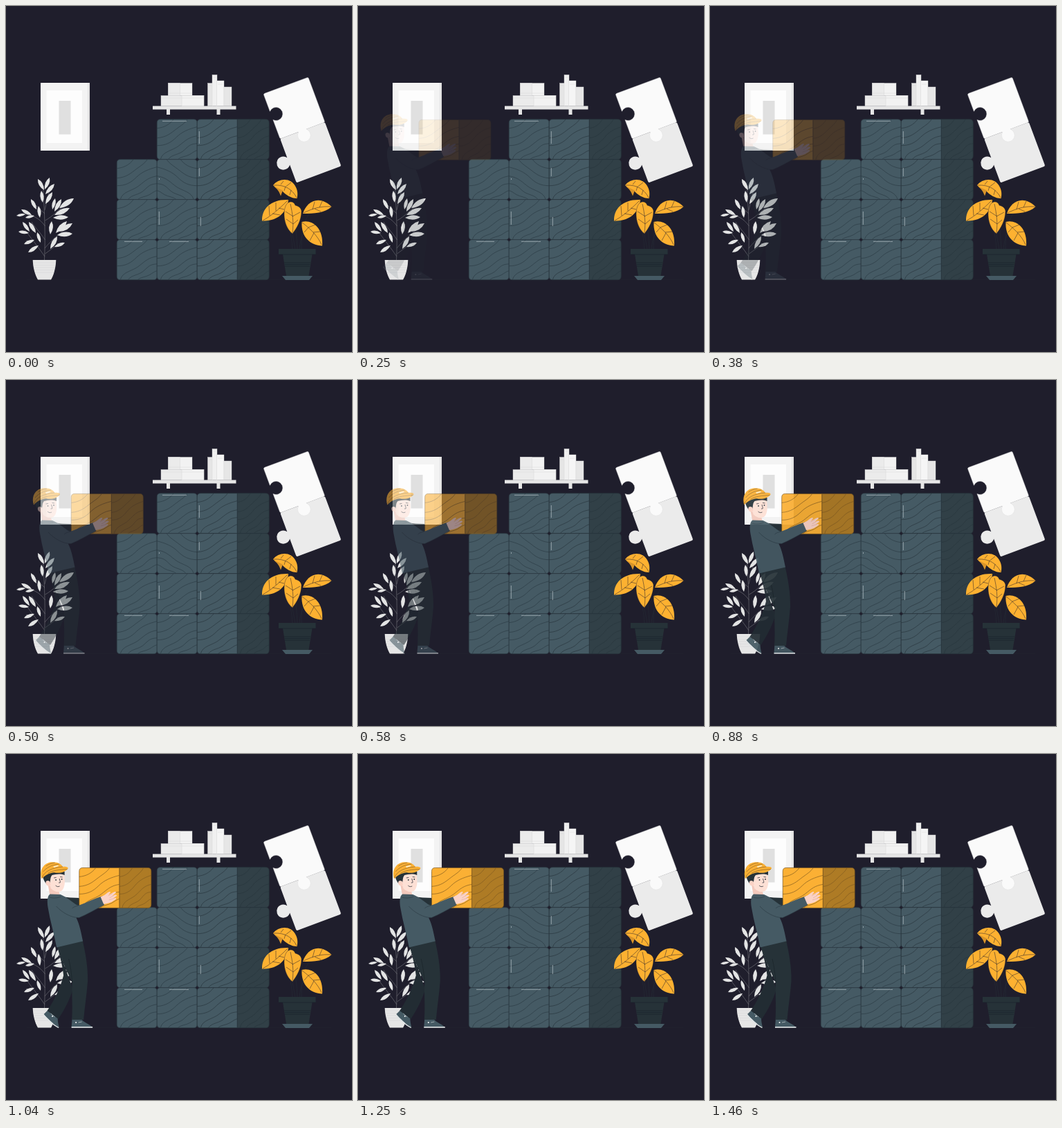
An HTML page that plays this animation: 500x500 px, repeating every 1.5 s.

```html
<!DOCTYPE html>
<html lang="en">
<head>
<meta charset="utf-8">
<title>Stacking crates</title>
<style>
  html, body { margin: 0; width: 100%; height: 100%; overflow: hidden; background: #1f1e2c; }
  svg { display: block; width: 100%; height: 100%; }
</style>
</head>
<body>
<svg viewBox="0 0 500 500" xmlns="http://www.w3.org/2000/svg">
  <defs>
    <path id="grain" fill="none" d="M0 13C10 12 18 8 24 0M0 27C14 26 20 20 28 14S40 6 44 0M0 38C12 38 20 34 28 26S46 14 58 11M5 58C8 46 22 46 32 38S46 26 58 24M16 58C22 50 32 52 40 44S50 36 58 35M30 58C34 54 42 54 47 51S54 46 58 45"/>
  </defs>
  <rect width="500" height="500" fill="#1f1e2c"/>
  <path d="M30 395.7H470" stroke="#222631" stroke-width=".5"/>

  <!-- picture -->
  <rect x="50" y="111" width="71" height="98" fill="#f3f3f3"/>
  <path d="M118 111H121V209H118Z" fill="#e4e4e4"/>
  <rect x="58.5" y="122" width="51.5" height="76" fill="#fdfdfd"/>
  <rect x="76.5" y="137" width="17" height="48.5" fill="#e0e0e0"/>

  <!-- shelf -->
  <g stroke="#d2d2d2" stroke-width=".4">
    <rect x="224" y="129.5" width="62" height="15" fill="#ebebeb"/>
    <rect x="254" y="129.5" width="32" height="15" fill="#f2f2f2"/>
    <rect x="234.5" y="111.5" width="34.5" height="18" fill="#f2f2f2"/>
    <rect x="234.5" y="111.5" width="17" height="18" fill="#ebebeb"/>
    <rect x="291.5" y="111.5" width="7" height="33" fill="#e6e6e6"/>
    <rect x="298" y="99.5" width="7" height="45" fill="#f0f0f0"/>
    <rect x="304.5" y="108" width="10.5" height="36.5" fill="#f5f5f5"/>
    <rect x="315" y="117" width="11" height="27.5" fill="#e6e6e6"/>
    <path d="M224 133H286M234.5 126H269M293 115H297M299.500 103H303.500M306 113H313" fill="none"/>
  </g>
  <path d="M212 144.500H332.500V149.500H309.500V157H304.500V149.500H237V157H232V149.500H212Z" fill="#e6e6e6"/>

  <!-- puzzle -->
  <g transform="translate(372 127) rotate(-20.400)">
    <path d="M2 69.300H67Q69 69.300 69 71.300V135Q69 137 67 137H2Q0 137 0 135V109.300A9.600 9.600 0 1 1 0 98.300V71.300Q0 69.300 2 69.300Z" fill="#ebebeb"/>
    <path d="M2 0H67Q69 0 69 2V67.500Q69 69.300 67 69.300H40.300A9.400 9.400 0 1 1 28.300 69.300H2Q0 69.300 0 67.500V40A9.600 9.600 0 1 0 0 27V2Q0 0 2 0Z" fill="#fafafa" stroke="#dcdcdc" stroke-width=".4"/>
  </g>

  <g id="stack" stroke-width=".7"></g>
  <path d="M226 166.300H261M279.300 181V199M279.300 234V246M221.300 297V316M281.300 305V318M171 340.300H197M236 340.300H264M221.500 249V251" stroke="#b9c5ca" stroke-width=".7" fill="none"/>

  <!-- plant on the right -->
  <path d="M418 352C414 330 412 320 411 300M421 352C420 315 412 290 408 272M424 352C426 330 432 322 438 322M427 352C427 320 432 305 445 292M414 352C412 320 404 300 396 292" stroke="#262c37" stroke-width=".6" fill="none"/>
  <g fill="#fdb131">
    <path d="M386 259C394 249 412 247 419 262C422 268 421.500 274 420.500 278C412 278 404 273 399 267C394 266.500 390 263 386 259Z"/>
    <path d="M387 260.500C393 265 395 269 397 274.500L400 266.500Z" fill="#d9942a"/>
    <path d="M370 310.500C369 293 383 279 408 280C407 296 394 311.500 370 310.500Z"/>
    <path d="M429 300C434 283 452 272 470.500 290C460 299.500 446 300 429 300Z"/>
    <path d="M427.500 312C440 308 459 318 457 346.500C440 346 426 334 427.500 312Z"/>
    <path d="M414 329C402 320 399 298 405 287C409 281 416 282 418 288C422 289 426 291 427 296C427 310 420 321 414 329Z" stroke="#1f1e2c" stroke-width=".4"/>
  </g>
  <path d="M387 259C403 258 414 265 420 277M397 258L401 253M405 260.500L412 255M404 260.500L402 267M412 266L410 273M371 310C384 303 396 292 407 281M381 303L380 289M390 296L390 284M385 300L396 302M394 292L402 294M414 328C416 312 414 300 411 286M415 315L405 308M415 304L404 297M415 315L422 309M414 304L425 298M430 299C444 292 456 289 470 290M443 294L446 283M453 291L457 282M446 293L455 297M428 313C440 322 451 333 456 345M437 320L447 316M444 327L455 326M437 320L431 327M445 328L439 339" fill="none" stroke="#312a2b" stroke-width=".55"/>
  <path d="M394 351H447.500V359H442.500L437.500 390H405L400 359H394Z" fill="#263238"/>
  <path d="M394 359H447.500M402 371H440M402.500 373.500H439.500M403 376H439" stroke="#17212a" stroke-width=".6"/>
  <path d="M399 390H443L438 396H404Z" fill="#455a64"/>

  <!-- plant on the left -->
  <path d="M55.500 367C57 335 56 300 53.500 262M56 362C48 350 38 338 30 327M56 350C66 338 76 330 84 324M56.500 338C48 325 40 318 37 312M56.500 318C48 306 38 302 24 300M56.500 310C68 304 78 292 88 286M56 295C58 286 60 278 62 270M56.500 358C64 353 70 347 78 343M56 300C52 296 47 292 43 288" fill="none" stroke="#77777f" stroke-width=".6"/>
  <g id="leaves" fill="#e3e4e4"></g>
  <path d="M38.700 367H72.300C72 380 68 391 65 395.500H46C42 389 39 378 38.700 367Z" fill="#e6e6e6"/>
  <path d="M39 371H72M39.500 374.500H71.500M40 378H71M41 381.500H70M42 385H69" stroke="#d3d3d5" stroke-width=".5"/>

  <!-- worker with crate -->
  <g id="worker">
    <path d="M78 206C88 207 96 208 105 208V221H90Z" fill="#263238"/>
    <g id="crate" stroke-width=".7"></g>

    <!-- legs and shoes -->
    <path d="M60 370L74 381C74 386 75 391 76 395C68 391 59 382 54 376Z" fill="#455a64"/>
    <path d="M54 376C59 382 68 391 76 395L75 396C67 392 57 383 53.500 377.500Z" fill="#dfe4e6"/>
    <path d="M95 382H107C113 389 121 391 124 394.500H94Z" fill="#455a64"/>
    <path d="M94 394H124.500V395.700H94Z" fill="#dfe4e6"/>
    <path d="M73 276C77 292 81 304 82.500 320C78 338 69 356 59 371L75 383C84 369 91 356 96 340Z" fill="#222c33"/>
    <path d="M73 277L110 269C114 287 118 308 117.500 328C116 348 113 366 111.500 384H94.500C96 364 94 345 95 330C89 318 79 296 73 277Z" fill="#263238"/>
    <path d="M95 330C94 318 93 308 90 296" stroke="#192228" stroke-width=".6" fill="none"/>
    <g fill="#fff"><circle cx="66.500" cy="379" r="1"/><circle cx="100.500" cy="388" r="1"/></g>
    <path d="M64 375L70 380M104 388L109 387" stroke="#dfe4e6" stroke-width=".6"/>

    <!-- head -->
    <path d="M60 189L63 205L78 206L75 196Z" fill="#f3c9bc"/>
    <path d="M61 176C67 174 76 172 83 172.500C85 182 85 193 80 197.500C75 201 69 199 64 194Z" fill="#fde0d5"/>
    <path d="M52.500 176C54 171 62 168 70 168L84 170L84 175C77 172 71 174 66 175C63 178 64 182 62.500 187L57 187C55 184 53 181 52.500 176Z" fill="#263238"/>
    <path d="M62.500 184C58 181 55.500 185 57.500 188.500C59 191 62 191 64 189.500Z" fill="#fbd3c6"/>
    <path d="M68.500 179L72 178.500M77.500 177.500L81 178M76.500 180C77 183 78.500 185 77.500 186L75.500 186M71 190C73 192 75 192 77 191" stroke="#33363f" stroke-width=".8" fill="none"/>
    <g fill="#263238"><circle cx="71.500" cy="182" r=".9"/><circle cx="80" cy="181" r=".9"/></g>
    <path d="M51 180.500C47 169 53 157.500 65 156.300C73 155.500 79 158.500 81.500 163C86 162.500 89.500 163.500 89 165.500C85 171 77 172.800 69 171.300C62 172 56 175 51 180.500Z" fill="#fbb034"/>
    <path d="M51.500 179C54 170 66 164 81.500 163M53 170C58 164 66 160 76 159M57 162C61 159 65 158 70 157M60 172.500C67 168 77 167 88 166.500" stroke="#8d6527" stroke-width=".7" fill="none"/>
    <path d="M67.500 162.500L74.500 160.800L75.500 162L69 164Z" fill="#fff0d2"/>

    <!-- jacket -->
    <path d="M63 202.500L78 203C85 206 94 212 103 220L101 237C106 247 108 259 110.500 270.500L72.500 279.500C69 260 63 241 60 222C58.500 213 59 205 63 202.500Z" fill="#455a64"/>
    <path d="M82 207C91 210 97 217 104 219C115 215 127 209 138 205.500L141 218C128 225 116 232 105 236.500C94 237 80 229 72 220" fill="#455a64"/>
    <path d="M72 220C80 229 94 237 105 236.500C116 232 128 225 141 218M62 207C67 208.500 73 208.500 79 206M104 219C100 220 97 221 95 223M138 205.500L141 218" stroke="#2b3a42" stroke-width=".6" fill="none"/>
    <path d="M136 206.500C140 205 143 203 146 200.500C149 198.500 151 198.500 150 200.500L147.500 203.500C151 202 154 199.500 157 199C159 199 158.500 200.500 157 201.500L153 205C156 203.500 158.500 203 159.500 204C160 205 157 207 154 208.500L158 208C159.500 208.500 158 210.500 155 212C151 215 146 216 140.500 217Z" fill="#fbd3c6"/>
    <path d="M147 205L153 201.500M149 208L155 204.500M148 211L156 208.500" stroke="#d69c8c" stroke-width=".5"/>
  </g>
</svg>
<script>
const LOOP = 1500, FRAMES = 36, SLIDE = 20, START = 3;
const el = id => document.getElementById(id);
const worker = el("worker");

function panel(x, y, w, fill, line, round, flip) {
  const h = 58, [l, r] = round;
  const shape = `M${x + l} ${y}H${x + w - r}q${r} 0 ${r} ${r}V${y + h - r}q0 ${r} ${-r} ${r}`
    + `H${x + l}q${-l} 0 ${-l} ${-l}V${y + l}q0 ${-l} ${l} ${-l}Z`;
  const sx = w / h;
  const place = `translate(${flip ? x + w : x} ${y}) scale(${flip ? -sx : sx} 1)`;
  return `<path d="${shape}" fill="${fill}" stroke="${line}"/>`
    + `<use href="#grain" transform="${place}" stroke="${line}" stroke-width=".65"/>`;
}

// A front face with its shaded side
function block(x, y, front, side, line, flip) {
  return panel(x + 58, y, 46, side, line, [0, 5])
    + panel(x, y, 58, front, line, [5, 0], flip);
}

let tiles = "";
for (let row = 0; row < 4; row++) {
  const y = 163.7 + row * 58;
  for (let col = row ? 0 : 1; col < 2; col++) {
    tiles += panel(160.2 + col * 58, y, 58, "#455a64", "#2b3a43", [5, 5], row === 1 && col === 1);
  }
  tiles += block(276.2, y, "#455a64", "#314047", "#27343c", false);
}
el("stack").innerHTML = tiles;
el("crate").innerHTML = block(105.2, 164.4, "#fbb034", "#ae7b25", "#77551f");

// Each leaf: base x, base y, tip x, tip y
function leaf([x, y, tx, ty]) {
  const dx = tx - x, dy = ty - y, k = 0.3;
  const mx = x + dx * 0.55, my = y + dy * 0.55;
  return `<path d="M${x} ${y}Q${mx - dy * k} ${my + dx * k} ${tx} ${ty}Q${mx + dy * k} ${my - dx * k} ${x} ${y}Z"/>`;
}
const leftLeaves = [
  [55, 266, 46, 250], [53, 284, 51, 267], [28, 301, 15, 303], [37, 302, 22, 294],
  [41, 303, 28, 306], [44, 294, 36, 279], [49, 306, 47, 289], [33, 328, 18, 326],
  [34, 326, 24, 312], [43, 328, 33, 312], [50, 342, 45, 327], [41, 338, 26, 344],
  [47, 346, 32, 356]
];
const rightLeaves = [
  [56, 265, 63, 248], [57, 272, 70, 257], [57, 286, 67, 269], [67, 294, 71, 278],
  [70, 297, 80, 279], [77, 292, 98, 278], [70, 302, 92, 292], [68, 306, 90, 305],
  [64, 330, 66, 311], [72, 328, 88, 311], [77, 326, 96, 314], [74, 331, 96, 329],
  [64, 351, 74, 333], [70, 348, 85, 342]
];
el("leaves").innerHTML = [...leftLeaves, ...rightLeaves].map(leaf).join("");

// Cubic bezier easing with a soft overshoot
function ease(p) {
  const curve = (a, b, s) => 3 * a * s * (1 - s) ** 2 + 3 * b * s * s * (1 - s) + s ** 3;
  let lo = 0, hi = 1;
  for (let i = 0; i < 30; i++) {
    const mid = (lo + hi) / 2;
    if (curve(0.36, 0.5, mid) < p) lo = mid; else hi = mid;
  }
  return curve(-0.01, 1.38, (lo + hi) / 2);
}

function draw(time) {
  const t = time % LOOP;
  const step = Math.min(FRAMES - 1, Math.floor((t + 4) / LOOP * FRAMES));
  const v = ease((step + 1) / FRAMES);
  worker.setAttribute("transform", `translate(${(SLIDE * (v - 1)).toFixed(2)} 0)`);
  worker.setAttribute("opacity", step < START ? 0 : Math.max(0, Math.min(1, v)).toFixed(3));
}

const begin = performance.now();
function tick() {
  draw(performance.now() - begin);
  requestAnimationFrame(tick);
}
draw(0);
requestAnimationFrame(tick);
</script>
</body>
</html>
```
